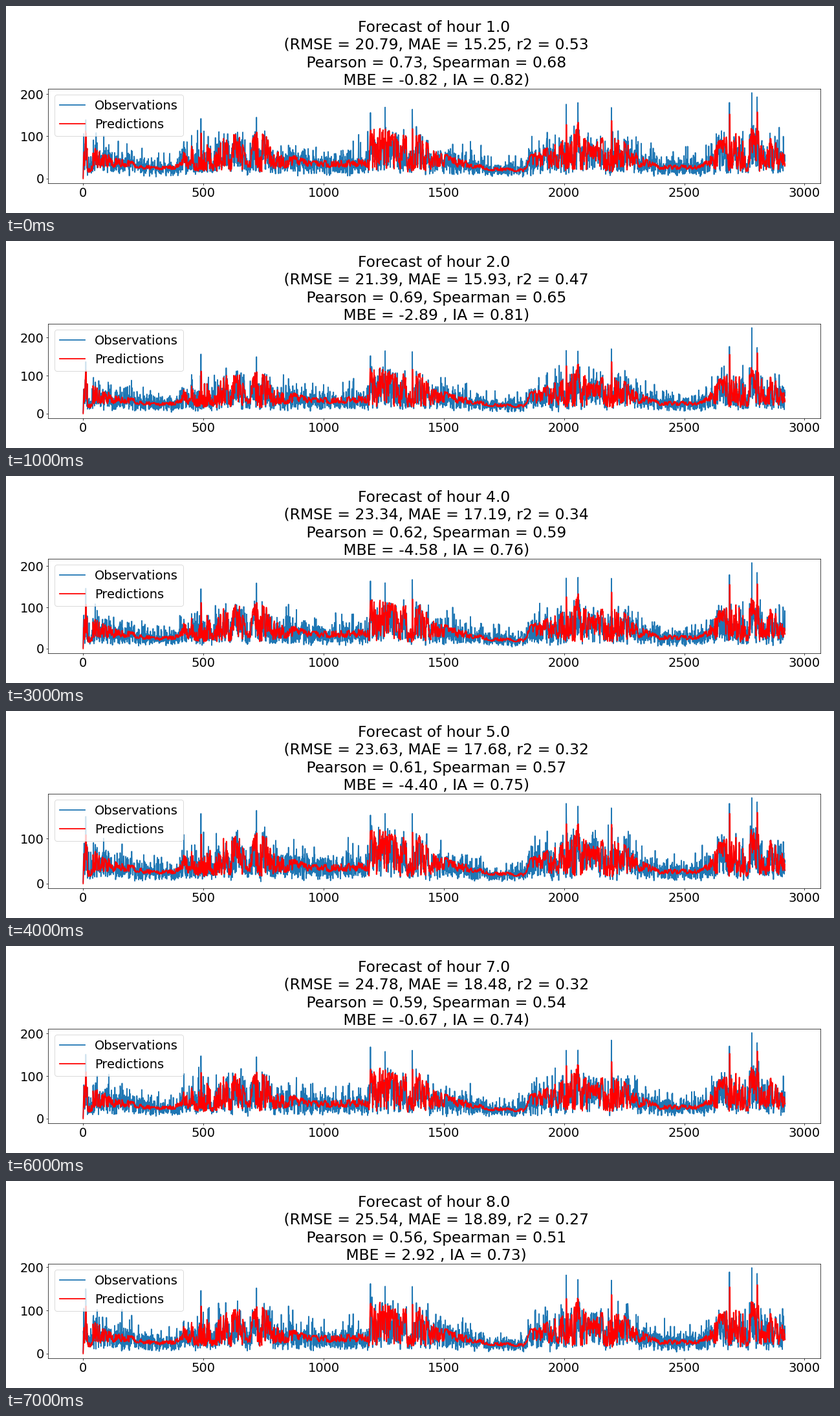
These frames come from a looping animation (1280x320 px, 8000 ms). A matplotlib script:

```python
import numpy as np
import matplotlib.pyplot as plt
from matplotlib.animation import FuncAnimation
from matplotlib.ticker import MultipleLocator

W, H, DPI = 1280, 320, 64
N = 2920
plt.rcParams.update({"font.family": "DejaVu Sans", "font.size": 22})

# Title text: RMSE, MAE, r2, Pearson, Spearman, MBE, IA for each forecast hour
SCORES = [
    (20.79, 15.25, 0.53, 0.73, 0.68, -0.82, 0.82),
    (21.39, 15.93, 0.47, 0.69, 0.65, -2.89, 0.81),
    (22.51, 16.62, 0.40, 0.65, 0.62, -3.94, 0.78),
    (23.34, 17.19, 0.34, 0.62, 0.59, -4.58, 0.76),
    (23.63, 17.68, 0.32, 0.61, 0.57, -4.40, 0.75),
    (24.22, 18.11, 0.32, 0.60, 0.55, -2.61, 0.75),
    (24.78, 18.48, 0.32, 0.59, 0.54, -0.67, 0.74),
    (25.54, 18.89, 0.27, 0.56, 0.51, 2.92, 0.73),
]
TOPS = [203, 226, 213, 208, 190, 196, 202, 199]  # highest observation
TOP_AT = 2781
STORMS = np.array([11, 490, 721, 1195, 1256, 1369, 2009, 2058, 2197, 2688, 2803])

# Key points of the seasonal mean level: sample, level
SEASON = [(0, 70), (50, 48), (120, 42), (300, 24), (380, 27), (420, 45),
          (520, 60), (650, 62), (685, 34), (720, 70), (800, 48), (950, 34),
          (1180, 37), (1195, 72), (1300, 62), (1400, 62), (1460, 46),
          (1600, 34), (1700, 23), (1830, 20), (1860, 42), (1990, 53),
          (2060, 74), (2110, 50), (2200, 62), (2300, 44), (2400, 27),
          (2570, 27), (2640, 54), (2780, 70), (2919, 46)]

x = np.arange(N)
level = np.interp(x, *zip(*SEASON))
# Calm seasons swing little, active ones swing widely
swing = 0.2 + 0.6 / (1 + np.exp((46 - level) / 5))


def smooth_noise(rng, phi):
    """Unit-variance noise that remembers its previous value."""
    noise = rng.normal(size=N) * np.sqrt(1 - phi ** 2)
    for i in range(1, N):
        noise[i] += phi * noise[i - 1]
    return noise


shared = np.random.default_rng(7)
weather = (0.8 * smooth_noise(shared, 0.88) + 0.5 * smooth_noise(shared, 0.3)
           + 0.4 * np.sin(2 * np.pi * x / 8))
gusts = shared.normal(size=N)


def make_series(hour, top):
    rng = np.random.default_rng(100 + hour)
    z = weather + 0.25 * smooth_noise(rng, 0.6)
    pred = level * (1 + swing * np.tanh(0.75 * z))
    for s in STORMS:
        pred[s:s + 3] = 110 + 55 * (s / N) ** 3 + rng.uniform(-4, 4)
    pred *= np.minimum(x / 4, 1)

    e = 0.7 * gusts + 0.7 * rng.normal(size=N)
    obs = level ** 0.4 * pred ** 0.6 * np.exp(np.where(e < 0, 0.6, 0.4) * e)
    lone = rng.integers(0, N, 14)
    obs[lone] = level[lone] * rng.uniform(2, 3, lone.size)
    obs = np.maximum(140 * np.tanh(obs / 140), 3)
    heights = 140 + 0.015 * STORMS + rng.uniform(-10, 12, STORMS.size)
    obs[STORMS] = np.minimum(heights, 0.95 * top)
    obs[TOP_AT] = top
    return obs, pred


def make_title(k):
    rmse, mae, r2, pearson, spearman, mbe, ia = SCORES[k]
    return (f"Forecast of hour {k + 1:.1f}\n"
            f" (RMSE = {rmse:.2f}, MAE = {mae:.2f}, r2 = {r2:.2f}\n"
            f" Pearson = {pearson:.2f}, Spearman = {spearman:.2f}\n"
            f" MBE = {mbe:.2f} , IA = {ia:.2f})")


series = [make_series(k, top) for k, top in enumerate(TOPS)]

fig = plt.figure(figsize=(W / DPI, H / DPI), dpi=DPI, facecolor="white")
ax = fig.add_axes([65 / W, 46.5 / H, 1193.5 / W, 146 / H])
obs_line, = ax.plot(x, series[0][0], color="tab:blue", lw=2,
                    label="Observations")
pred_line, = ax.plot(x, series[0][1], color="red", lw=2, label="Predictions")
ax.set_xlim(-0.05 * (N - 1), 1.05 * (N - 1))
ax.xaxis.set_major_locator(MultipleLocator(500))
ax.yaxis.set_major_locator(MultipleLocator(100))
ax.legend(loc="upper left")
title = ax.set_title("", linespacing=1.25)


def update(k):
    obs, pred = series[k]
    obs_line.set_ydata(obs)
    pred_line.set_ydata(pred)
    ax.set_ylim(-0.05 * TOPS[k], 1.05 * TOPS[k])
    title.set_text(make_title(k))
    return obs_line, pred_line, title


anim = FuncAnimation(fig, update, frames=len(TOPS), interval=1000,
                     init_func=lambda: update(0), repeat=True, repeat_delay=0)
plt.show()
```
